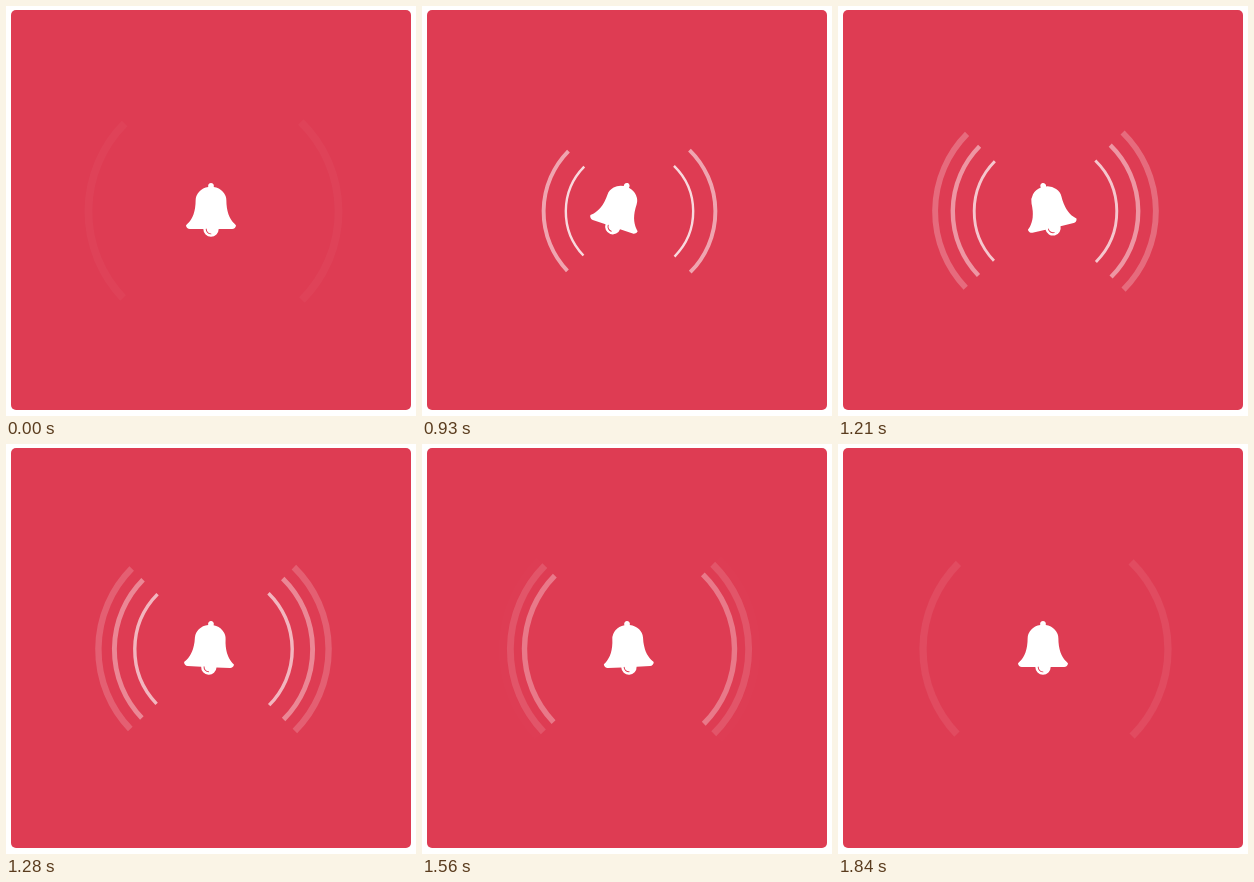
An HTML page for the animation above (2370 ms loop, 410 by 410 pixels).

```html
<!DOCTYPE html>
<html lang="en">
<head>
<meta charset="utf-8">
<title>Ringing bell</title>
<style>
  html, body { margin: 0; width: 100%; height: 100%; overflow: hidden; background: #fff; }
  svg { display: block; width: 410px; height: 410px; }
</style>
</head>
<body>
<svg viewBox="0 0 410 410">
  <rect x="5" y="4" width="400" height="400" rx="5" fill="#de3c53"/>
  <g id="waves" fill="none" stroke="#fff"></g>
  <g id="bell">
    <path transform="translate(205 177) scale(.03)" fill="#fff" fill-rule="evenodd" d="
      M832 1408q0 52-38 90t-90 38H256q0 106-75 181T0 1792t-181-75-75-181h-448q-52 0-90-38t-38-90
      q50-42 91-88t85-119.5 74.5-158.5 50-206T-512 576q0-152 117-282.5T-88 135q-8-19-8-39
      0-40 28-68T0 0t68 28 28 68q0 20-8 39 190 28 307 158.5T512 576q0 139 19.5 260t50 206
      74.5 158.5 85 119.5 91 88z
      M16 1696q0-16-16-16-59 0-101.5-42.5T-144 1536q0-16-16-16t-16 16q0 73 51.5 124.5T0 1712q16 0 16-16z"/>
  </g>
</svg>
<script>
const LOOP = 2370, SPACING = 3, LIFE = 13.2, LAST = 18;
const STARTS = [670, 730, 800, 870, 930];
for (let t = 1000; t <= 1840; t += 70) STARTS.push(t);

const bell = document.getElementById('bell');
const group = document.getElementById('waves');
const waves = [0, 1, 2].map(() =>
  group.appendChild(document.createElementNS('http://www.w3.org/2000/svg', 'path')));

function arc(r, from, to) {
  const point = deg => {
    const a = deg * Math.PI / 180;
    return `${207.5 + r * Math.cos(a)} ${205.5 + r * Math.sin(a)}`;
  };
  return `M${point(from)}A${r} ${r} 0 0 1 ${point(to)}`;
}

// Quick pull to one side, then a damped pendulum
function swing(step) {
  if (step >= LAST) return 0;
  if (step < 4) return 27 * Math.sin(step * Math.PI / 8);
  const damping = 1 - ((step - 4) / 14) ** 1.4;
  return 28 * damping * Math.cos((step - 4) * Math.PI / 3.88);
}

function drawWave(wave, age) {
  const visible = age >= 0 && age < LIFE;
  wave.setAttribute('opacity', visible ? 0.9 * (1 - age / LIFE) ** 1.4 : 0);
  if (!visible) return;
  const r = 56 + 72 * Math.sin(age * 0.107);
  wave.setAttribute('d', arc(r, -45.7, 45) + arc(r, 136.3, 224.7));
  wave.setAttribute('stroke-width', 1.9 + age / 2);
}

function draw(now) {
  const t = now % LOOP;
  // The opening pause holds the faint tail of the previous ring
  const step = STARTS.filter(start => start <= t).length || LAST + 1;
  bell.setAttribute('transform', `rotate(${swing(step)} 205 179)`);
  waves.forEach((wave, i) => drawWave(wave, step - 1 - i * SPACING));
}

function tick() {
  draw(performance.now());
  requestAnimationFrame(tick);
}
tick();
</script>
</body>
</html>
```
